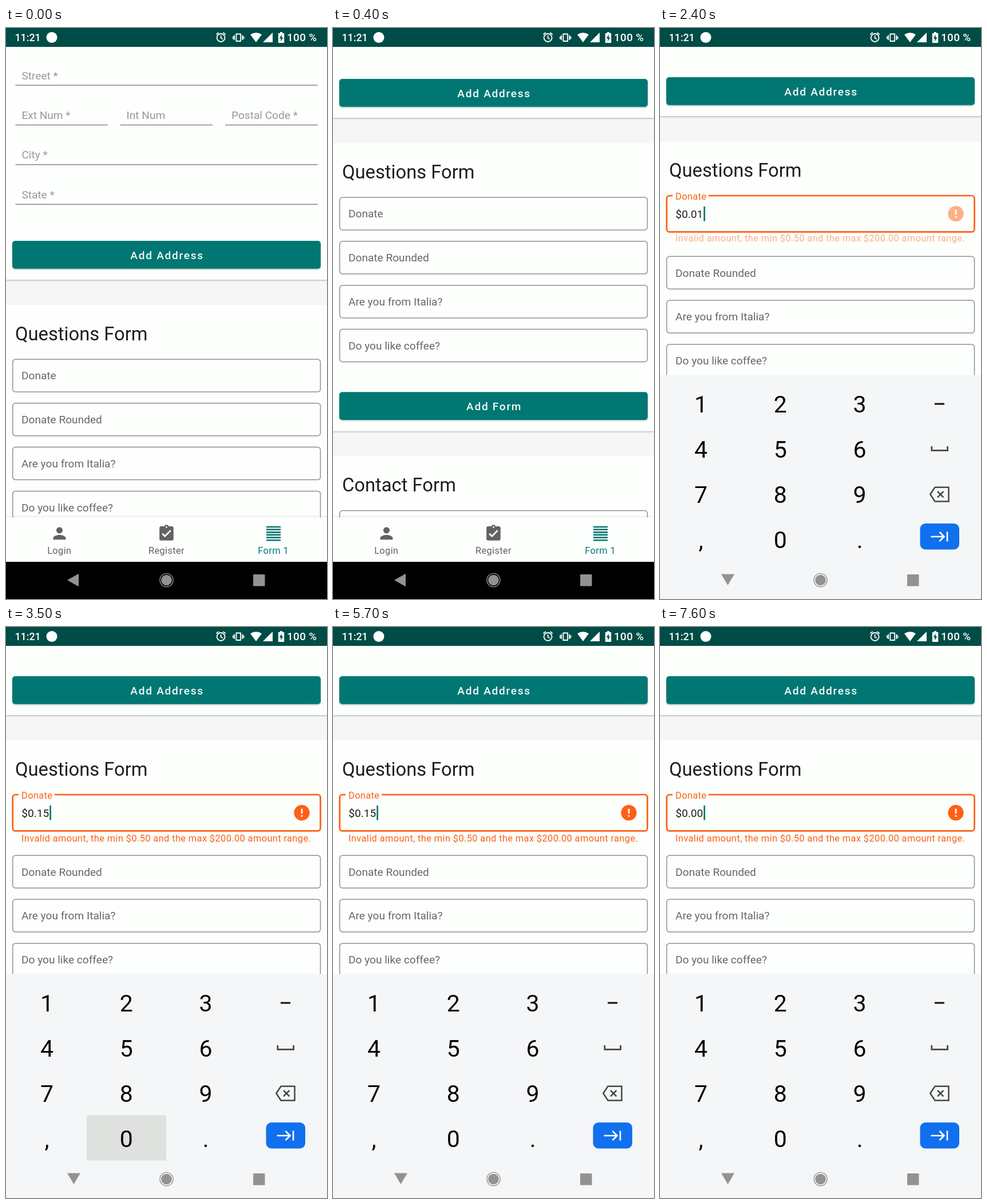
Write an HTML page that moves like this. It is 561 px wide and 998 px high and loops after 8 s.

```html
<!DOCTYPE html>
<html lang="en">
<head>
<meta charset="utf-8">
<title>Form demo</title>
<style>
  html, body { margin: 0; width: 100%; height: 100%; overflow: hidden; background: #fdfffd; }
  svg { display: block; width: 100%; height: 100%; }
  text { font-family: Roboto, Arial, sans-serif; white-space: pre; }
  .title { font-size: 32.76px; fill: #1d1f1e; }
  .label { font-size: 19.1px; fill: #666867; }
  .hint { font-size: 19.1px; fill: #989a99; }
  .value { font-size: 19.1px; fill: #1d1f1e; }
  .small { font-size: 16.38px; letter-spacing: .4px; }
  .btn { font-size: 19.1px; font-weight: 500; letter-spacing: 1.7px; fill: #f4fbfa; text-anchor: middle; }
  .key { font-size: 41px; fill: #050505; text-anchor: middle; }
  .status { font-weight: 500; fill: #fff; }
  .mid { text-anchor: middle; }
  .box { fill: none; stroke: #8f9190; stroke-width: 1.5; }
</style>
</head>
<body>
<svg viewBox="0 0 561 998" preserveAspectRatio="none">
  <defs>
    <filter id="soft" x="-5%" y="-5%" width="110%" height="115%">
      <feDropShadow dx="0" dy="1.5" stdDeviation="1.3" flood-color="#000" flood-opacity=".25"/>
    </filter>
  </defs>
  <rect width="561" height="998" fill="#f5f6f5"/>
  <g id="page">
    <g id="upper"></g>
    <g id="field">
      <rect id="outline" class="box" x="11.7" y="579" width="537.8" rx="5"/>
      <rect id="notch" x="22" y="575" width="63" height="8" fill="#fdfffd"/>
      <text id="name" x="27">Donate</text>
      <text id="value" class="value" x="27.3" y="618"></text>
      <rect id="caret" width="2.7" height="25.5" fill="#007773"/>
      <g id="error" fill="#fe5f15">
        <circle cx="517" cy="610.7" r="13.6"/>
        <path d="M515.6 603.7h2.9v8.6h-2.9zM515.6 614.9h2.9v2.9h-2.9z" fill="#fff"/>
        <text id="helper" class="small" x="27" y="661">Invalid amount, the min $0.50 and the max $200.00 amount range.</text>
      </g>
    </g>
    <g id="lower"></g>
  </g>

  <g id="tabs">
    <rect y="852" width="561" height="4" fill="#000" opacity=".035"/>
    <rect y="855.5" width="561" height="78" fill="#fdfffd"/>
    <g fill="#616362">
      <path transform="translate(77.1 867) scale(1.365)" d="M12 12c2.21 0 4-1.79 4-4s-1.79-4-4-4-4 1.79-4 4 1.79 4 4 4zm0 2c-2.67 0-8 1.34-8 4v2h16v-2c0-2.66-5.33-4-8-4z"/>
      <path transform="translate(264.1 867) scale(1.365)" d="M19 3h-4.18C14.4 1.84 13.3 1 12 1c-1.3 0-2.4.84-2.82 2H5c-1.1 0-2 .9-2 2v14c0 1.1.9 2 2 2h14c1.1 0 2-.9 2-2V5c0-1.1-.9-2-2-2zm-7 0c.55 0 1 .45 1 1s-.45 1-1 1-1-.45-1-1 .45-1 1-1zm-2 14l-4-4 1.41-1.41L10 14.17l6.59-6.59L18 9l-8 8z"/>
      <text class="small mid" x="93.3" y="919">Login</text>
      <text class="small mid" x="280.5" y="919">Register</text>
    </g>
    <g fill="#007773">
      <path id="bars" fill="none" stroke="#007773" stroke-width="2.7"/>
      <text class="small mid" x="467.2" y="919">Form 1</text>
    </g>
    <rect y="933" width="561" height="65"/>
  </g>

  <g id="keyboard">
    <rect y="606.5" width="561" height="392" fill="#f4f6f8"/>
    <rect id="press" width="139" height="79" fill="#dfe1df"/>
    <g id="keys"></g>
    <g fill="none" stroke="#444746" stroke-width="2.7">
      <path d="M480 657h17" stroke="#111" stroke-width="3"/>
      <path d="M474.8 731v7.4h27.8V731"/>
      <path d="M472.3 815l8.2-12.2h24v24.6h-24zM485 810l10.4 10.4m0-10.4L485 820.4" stroke-width="2.5"/>
    </g>
    <rect x="454.5" y="866" width="68.5" height="45.5" rx="9.5" fill="#1170ee"/>
    <path d="M473.5 889h22M488.5 881l8 8-8 8M502 880.5v17" fill="none" stroke="#fff" stroke-width="2.6"/>
  </g>

  <g fill="#929292">
    <path id="back"/>
    <circle cx="280.5" cy="965" r="9.3"/>
    <circle cx="280.5" cy="965" r="11.6" fill="none" stroke="#929292" stroke-width="1.4"/>
    <rect x="432" y="955" width="20.5" height="20.5" rx="1"/>
  </g>

  <rect width="561" height="33" fill="#004c46"/>
  <text class="status" x="15.5" y="23" font-size="17.8">11:21</text>
  <text class="status" x="491" y="23.2" font-size="18.8" letter-spacing=".4">100 %</text>
  <g fill="#fff">
    <circle cx="80" cy="16.5" r="9.5"/>
    <path d="M427 11.5Q437 5 447 11.5L437 25zM466 8v17h-17zM479 7h4v2h3.2v17h-10.4V9h3.2z"/>
    <path d="M481.8 11.5l-4 6.8h2.6v5l4-6.8h-2.6z" fill="#004c46"/>
    <g fill="none" stroke="#fff" stroke-width="1.8">
      <circle cx="375.6" cy="17" r="7"/>
      <path d="M375.6 13v4.5l3.2 2M367.5 11.5l4.2-3.6M383.7 11.5l-4.2-3.6M402.4 10.5h7.6v12.5h-7.6zM399.2 12.5v8.5M413.2 12.5v8.5M397 14.5v5M415.4 14.5v5"/>
    </g>
  </g>
</svg>
<script>
const $ = id => document.getElementById(id);
const set = (id, attrs) => { for (const k in attrs) $(id).setAttribute(k, attrs[k]); };
const ramp = (t, a, b) => Math.min(1, Math.max(0, (t - a) / (b - a)));
const mix = (a, b, p) => a + (b - a) * p;

const TEAL = '#007773', ORANGE = '#fe5f15', LOOP = 8000;
const LEFT = 27.3, SCROLL = 286, FIELD_GROWTH = 29.5;

const text = (cls, x, y, s) => `<text class="${cls}" x="${x}" y="${y}">${s}</text>`;
const card = (y, h) => `<rect x="-1" y="${y}" width="563" height="${h}" rx="3" fill="#fdfffd" filter="url(#soft)"/>`;
const button = (y, s) => `<rect x="11" y="${y}" width="539" height="48.7" rx="5" fill="${TEAL}" filter="url(#soft)"/>`
  + text('btn', 281.6, y + 31.7, s);
const line = (x, w, y, s) => `<path d="M${x} ${y}h${w}" stroke="#858786" stroke-width="1.5"/>` + text('hint', x + 11, y - 10.4, s);
const box = (y, s) => `<rect class="box" x="11.7" y="${y}" width="537.8" height="57" rx="5"/>` + text('label', 27, y + 35.2, s);

$('upper').innerHTML = card(-60, 500)
  + line(16.4, 528.4, 100, 'Street *')
  + line(16.4, 161.4, 169.4, 'Ext Num *') + line(199.6, 161.4, 169.4, 'Int Num') + line(383, 161.8, 169.4, 'Postal Code *')
  + line(16.4, 528.4, 238.8, 'City *') + line(16.4, 528.4, 308.2, 'State *')
  + button(372, 'Add Address')
  + card(484, 503.5) + text('title', 16, 545.5, 'Questions Form');

$('lower').innerHTML = ['Donate Rounded', 'Are you from Italia?', 'Do you like coffee?']
  .map((s, i) => box(655.8 + 76.8 * i, s)).join('')
  + button(919.3, 'Add Form')
  + card(1031, 600) + text('title', 16, 1092.5, 'Contact Form') + box(1126.5, 'Name');

$('keys').innerHTML = [...'123456789,0.']
  .map((c, i) => text('key', 71.5 + 138.8 * (i % 3), 671.5 + 79.1 * Math.floor(i / 3), c)).join('');

$('bars').setAttribute('d', Array.from({ length: 6 }, (_, i) => `M455 ${872 + 4.65 * i}h25`).join(''));

// [time, amount in cents]
const amounts = [[2400, 1], [3300, 15], [3600, 150], [3800, 1500], [4900, 150], [5500, 15], [7100, 1], [7500, 0]];
// The caret restarts its blink at each of these times
const blinks = [1000, 2500, 3300, 3600, 3800, 4900, 5500, 7100, 7500];
// [from, to, x, y]
const presses = [
  [3500, 3600, 141, 853.5], [3700, 3800, 141, 853.5],
  [4800, 4900, 419, 774.3], [7000, 7200, 419, 774.3], [7400, 7600, 419, 774.3]
];

function draw(t) {
  const scroll = SCROLL * (1 - Math.exp(-Math.pow(t / 145.7, 1.5)));
  set('page', { transform: `translate(0 ${-scroll})` });

  const entry = amounts.filter(a => a[0] <= t).pop();
  const filled = !!entry;
  const value = filled ? '$' + (entry[1] / 100).toFixed(2) : '';
  const invalid = filled && entry[1] < 50;
  const focused = t >= 1000;
  const accent = invalid ? ORANGE : TEAL;

  const up = ramp(t, 900, 1100);
  set('outline', {
    height: filled ? 63.4 : 57,
    style: focused ? `stroke:${accent};stroke-width:2.7` : ''
  });
  set('notch', { opacity: up });
  set('name', {
    y: mix(614.2, 585.8, up),
    style: `font-size:${mix(19.1, 16.38, up)}px;letter-spacing:${mix(0, .4, up)}px;fill:${focused ? accent : '#666867'}`
  });
  if ($('value').textContent !== value) $('value').textContent = value;

  const since = t - (blinks.filter(b => b <= t).pop() || 0);
  const width = filled ? $('value').getComputedTextLength() : 0;
  set('caret', {
    x: LEFT + width + (filled ? 1 : 0),
    y: filled ? 598 : 594.3,
    opacity: focused && since % 1000 < 500 ? 1 : 0
  });

  const err = ramp(t, 2300, 2500) - ramp(t, 3500, 3700) + ramp(t, 5400, 5700);
  set('error', { opacity: err });
  set('helper', { transform: `translate(0 ${-5 * (1 - err)})` });
  set('lower', { transform: `translate(0 ${filled ? FIELD_GROWTH : 0})` });

  const open = 1 - Math.pow(1 - ramp(t, 1000, 1200), 2);
  set('keyboard', { transform: `translate(0 ${400 * (1 - open)})` });
  const press = presses.find(p => p[0] <= t && t < p[1]);
  set('press', press ? { x: press[2], y: press[3], opacity: 1 } : { opacity: 0 });
  set('back', { d: open > 0 ? 'M107 954.5h23l-11.5 19.5z' : 'M107 965l20-11.2v22.4z' });
}

function tick(now) {
  draw(Math.floor((now % LOOP) / 100) * 100);
  requestAnimationFrame(tick);
}
draw(0);
requestAnimationFrame(tick);
</script>
</body>
</html>
```
